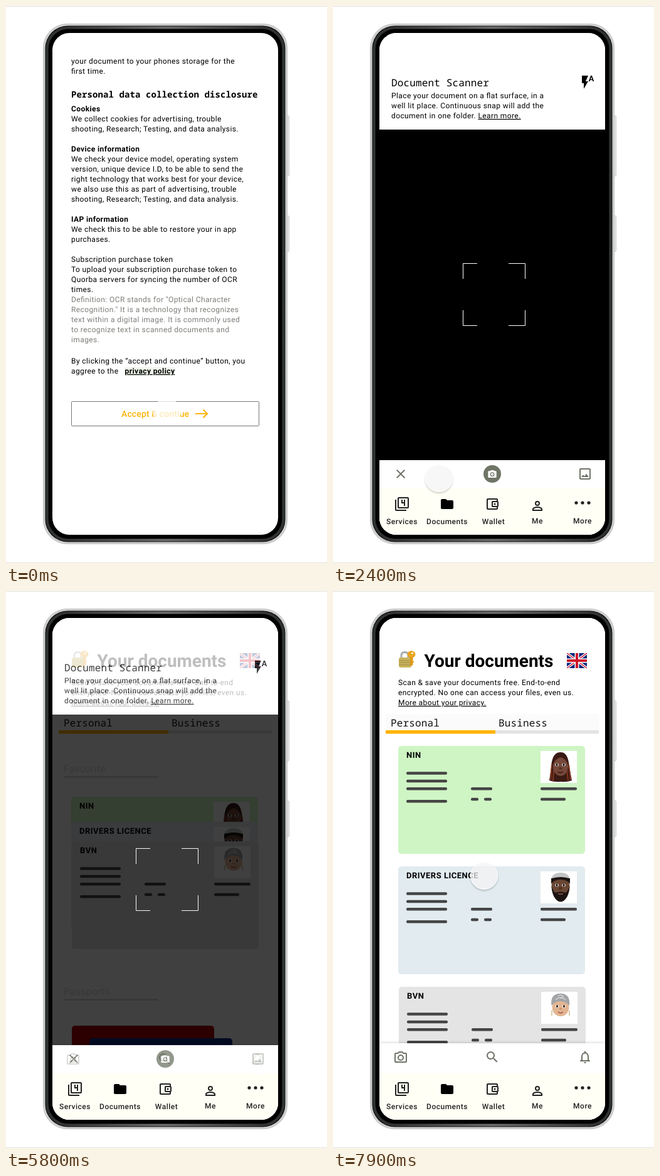
Animation of 512 by 888 pixels, one loop 8000 ms. Source, as an HTML page:

```html
<!DOCTYPE html>
<html lang="en">
<head>
<meta charset="utf-8">
<title>Document scanner prototype</title>
<style>
html, body { margin: 0; width: 100%; height: 100%; overflow: hidden; background: #fff; }
svg { position: absolute; left: 0; top: 0; display: block; }
text {
  font: 400 12px Roboto, sans-serif; letter-spacing: .4px; white-space: pre;
  font-feature-settings: "liga" 1; text-rendering: geometricPrecision;
}
.b { font-weight: 700; }
.u { text-decoration: underline 1px; text-underline-offset: 1.5px; }
.mono { font: 400 16px "Roboto Mono", "Noto Sans Mono", monospace; letter-spacing: .15px; }
.mono.b { font-weight: 700; font-size: 14px; letter-spacing: .1px; }
.big { font: 700 28px Roboto, sans-serif; letter-spacing: 0; }
.sec { font-size: 16px; letter-spacing: .1px; }
.lab { font-weight: 500; letter-spacing: .5px; text-anchor: middle; fill: #222; }
.title { font-weight: 700; font-size: 13px; letter-spacing: .5px; }
.cta { font-weight: 500; font-size: 14px; letter-spacing: .1px; fill: #fbb40a; }
.bar { filter: drop-shadow(0 -1px 2px rgba(0,0,0,.16)); }
#fav, #pass { color: #d9d9d9; }
#cursor {
  position: absolute; left: -22px; top: -22px; width: 44px; height: 44px;
  box-sizing: border-box; border: 1px solid #fff; border-radius: 50%;
}
</style>
</head>
<body>
<svg id="stage" width="512" height="888" viewBox="0 0 512 888"></svg>
<div id="cursor"></div>
<script>
const LOOP = 8000, STEP = 100;

const icons = {
  flash: 'M3 2v12h3v9l7-12H9l4-9H3zm16 0h-2l-3.2 9h1.9l.7-2h3.2l.7 2h1.9L19 2zm-2.15 5.65L18 4l1.15 3.65h-2.3z',
  close: 'M19 6.4 17.6 5 12 10.6 6.4 5 5 6.4 10.6 12 5 17.6 6.4 19 12 13.4 17.6 19 19 17.6 13.4 12z',
  snap: 'M9 2L7.17 4H4c-1.1 0-2 .9-2 2v12c0 1.1.9 2 2 2h16c1.1 0 2-.9 2-2V6c0-1.1-.9-2-2-2h-3.17L15 2zm3 15a5 5 0 1 1 0-10a5 5 0 1 1 0 10zM12 8.8a3.2 3.2 0 1 0 0 6.4a3.2 3.2 0 1 0 0-6.4z',
  image: 'M19 5v14H5V5h14m0-2H5c-1.1 0-2 .9-2 2v14c0 1.1.9 2 2 2h14c1.1 0 2-.9 2-2V5c0-1.1-.9-2-2-2zm-4.86 8.86l-3 3.87L9 13.14 6 17h12z',
  camera: 'M20 4h-3.17L15 2H9L7.17 4H4c-1.1 0-2 .9-2 2v12c0 1.1.9 2 2 2h16c1.1 0 2-.9 2-2V6c0-1.1-.9-2-2-2zm0 14H4V6h4.05l1.83-2h4.24l1.83 2H20zM12 7a5 5 0 1 0 0 10a5 5 0 1 0 0-10zm0 8a3 3 0 1 1 0-6a3 3 0 1 1 0 6z',
  search: 'M15.5 14h-.79l-.28-.27A6.5 6.5 0 1 0 13.73 14.43l.27.28v.79l5 4.99L20.49 19zm-6 0a4.5 4.5 0 1 1 0-9a4.5 4.5 0 1 1 0 9z',
  bell: 'M12 22c1.1 0 2-.9 2-2h-4c0 1.1.9 2 2 2zm6-6v-5c0-3.07-1.63-5.64-4.5-6.32V4a1.5 1.5 0 0 0-3 0v.68C7.64 5.36 6 7.92 6 11v5l-2 2v1h16v-1zm-2 1H8v-6c0-2.48 1.51-4.5 4-4.5s4 2.02 4 4.5z',
  services: 'M3 5H1v16c0 1.1.9 2 2 2h16v-2H3zm18-4H7c-1.1 0-2 .9-2 2v14c0 1.1.9 2 2 2h14c1.1 0 2-.9 2-2V3c0-1.1-.9-2-2-2zm0 16H7V3h14zm-6-2h2V5h-2v4h-2V5h-2v6h4z',
  folder: 'M10 4H4c-1.1 0-2 .9-2 2v12c0 1.1.9 2 2 2h16c1.1 0 2-.9 2-2V8c0-1.1-.9-2-2-2h-8z',
  wallet: 'M21 7.28V5c0-1.1-.9-2-2-2H5c-1.1 0-2 .9-2 2v14c0 1.1.9 2 2 2h14c1.1 0 2-.9 2-2v-2.28c.59-.35 1-.98 1-1.72V9c0-.74-.41-1.37-1-1.72zM20 9v6h-7V9zM5 19V5h14v2h-6c-1.1 0-2 .9-2 2v6c0 1.1.9 2 2 2h6v2zM16 10.5a1.5 1.5 0 1 0 0 3a1.5 1.5 0 1 0 0-3z',
  person: 'M12 6a2 2 0 1 1 0 4a2 2 0 1 1 0-4m0 9c2.7 0 5.8 1.29 6 2v1H6v-1c.2-.72 3.3-2 6-2m0-11a4 4 0 1 0 0 8a4 4 0 1 0 0-8zm0 9c-2.67 0-8 1.34-8 4v3h16v-3c0-2.66-5.33-4-8-4z'
};

const rect = (x, y, w, h, fill, r = 0, more = '') =>
  `<rect x="${x}" y="${y}" width="${w}" height="${h}" rx="${r}" fill="${fill}" ${more}/>`;
const oval = (x, y, rx, ry, fill) => `<ellipse cx="${x}" cy="${y}" rx="${rx}" ry="${ry}" fill="${fill}"/>`;
const path = (d, fill, more = '') => `<path d="${d}" fill="${fill}" ${more}/>`;
const line = (d, color, w) => path(d, 'none', `stroke="${color}" stroke-width="${w}"`);
const text = (x, y, s, cls = '', fill = '#000') => `<text x="${x}" y="${y}" class="${cls}" fill="${fill}">${s}</text>`;
const lines = (x, y, rows, fill) => rows.map((s, i) => text(x, y + i * 16, s, '', fill)).join('');
const icon = (name, x, y, fill = '#6f7468', k = 1) =>
  path(icons[name], fill, `fill-rule="evenodd" transform="translate(${x} ${y}) scale(${k})"`);
const group = (id, body, more = '') => `<g id="${id}" ${more}>${body}</g>`;

function phone() {
  const button = (y, h) => rect(446, y, 5.5, h, '#e6e6e5', 1.5, 'stroke="#b0b0ae" stroke-width=".6"');
  return rect(0, 0, 512, 1, '#e2e2e2') + rect(0, 887, 512, 1, '#e2e2e2') +
    button(175, 96) + button(334.5, 57) +
    rect(59.5, 28.5, 389, 829, '#cfd0ce', 38, 'stroke="#c2c3c1"') +
    rect(62.5, 31.5, 383, 823, '#0c0d0d', 36) +
    rect(65.5, 34.5, 377, 817, 'none', 34, 'stroke="url(#shell)" stroke-width="4"') +
    rect(68, 37, 372, 812, '#000', 32) +
    rect(74, 43, 360, 800, '#fff', 27);
}

function privacy() {
  return lines(104, 92, ['your document to your phones storage for the', 'first time.']) +
    text(104, 146, 'Personal data collection disclosure', 'mono b') +
    text(104, 168, 'Cookies', 'b') +
    lines(104, 184, ['We collect cookies for advertising, trouble', 'shooting, Research; Testing, and data analysis.']) +
    text(104, 232, 'Device information', 'b') +
    lines(104, 248, ['We check your device model, operating system',
      'version, unique device I.D, to be able to send the',
      'right technology that works best for your device,',
      'we also use this as part of advertising, trouble',
      'shooting, Research; Testing, and data analysis.']) +
    text(104, 344, 'IAP information', 'b') +
    lines(104, 360, ['We check this to be able to restore your in app', 'purchases.']) +
    lines(104, 408, ['Subscription purchase token', 'To upload your subscription purchase token to',
      'Quorba servers for syncing the number of OCR', 'times.']) +
    lines(104, 472, ['Definition: OCR stands for "Optical Character',
      'Recognition." It is a technology that recognizes',
      'text within a digital image. It is commonly used',
      'to recognize text in scanned documents and', 'images.'], '#7d7d78') +
    lines(104, 570, ['By clicking the “accept and continue” button, you', 'aggree to the']) +
    rect(189, 576, 80, 13, '#eef4ea') + text(189.5, 586, 'privacy policy', 'b u') +
    rect(104.5, 630.5, 299, 39, 'none', 1, 'stroke="#777"') +
    text(184, 655, 'Accept &amp; contiue', 'cta') +
    line('M302 650H321M314.5 643.5L321 650L314.5 656.5', '#fbb40a', 2);
}

function scanner() {
  return rect(74, 43, 360, 800, '#fff') + rect(74, 197, 360, 527, '#000') +
    text(93, 128, 'Document Scanner', 'mono') +
    lines(93, 147, ['Place your document on a flat surface, in a',
      'well lit place. Continuous snap will add the',
      'document in one folder. <tspan class="u">Learn more.</tspan>']) +
    icon('flash', 394, 109, '#000') +
    line('M207.5 435V410.5H230M280 410.5H306.5V435M207.5 485V509.5H230M280 509.5H306.5V485', '#fff', 1) +
    icon('close', 96, 734) + oval(254, 746, 14, 14, '#6f7566') +
    icon('snap', 246, 738.6, '#fff', .67) + icon('image', 390, 734);
}

function nav() {
  const ink = '#222';
  return rect(74, 769, 360, 74, '#fffff5') +
    icon('services', 98, 782, ink) + icon('folder', 170, 782, '#000') +
    icon('wallet', 242, 782, ink) + icon('person', 314, 785, ink) +
    [388, 398, 408].map(x => oval(x, 792, 2.6, 2.6, ink)).join('') +
    [['Services', 110, 826], ['Documents', 182, 826], ['Wallet', 256, 826], ['Me', 326, 825], ['More', 398, 825]]
      .map(([s, x, y]) => text(x, y, s, 'lab')).join('');
}

const eyes = (y, c) => [26, 37].map(x => oval(x, y, 2.8, 2.3, '#fff') + oval(x, y, 1.7, 1.9, c)).join('');
const smile = (y, c) => line(`M27.500 ${y}q4 3.500 8 0`, c, 1.5);

const faces = {
  girl: path('M32 2C21 2 18 13 17 26L14 47q8 3 18 2q11 1 18-2L46 26C45 13 42 2 32 2z', '#3a1a14') +
    line('M18 22L16 46M21 30L20 48M45 22L48 46M42 30L44 48', '#84371f', 2) +
    oval(32, 25, 12, 15, '#75483a') + path('M19.500 22Q22 6 32 5Q41 6 44.500 22Q40 12 32 10Q24 12 19.500 22z', '#3a1a14') +
    oval(32, 28, 2.6, 2, '#573224') + eyes(22, '#150b08') + smile(33, '#35150f'),
  man: oval(32, 24, 14.5, 17, '#6a4634') +
    path('M17.500 23Q18 37 24 44Q32 53 40 44Q46 37 46.500 23Q44 32 40 34Q32 31 24 34Q20 32 17.500 23z', '#1b1412') +
    path('M17 20V11Q32 7 47 11V20Q44 14 32 13Q20 14 17 20z', '#1b1412') +
    path('M17.500 11Q20 2 32 2Q44 2 46.500 11Q32 7 17.500 11z', '#c2c5c6') +
    oval(32, 27, 3, 2.2, '#53331f') + eyes(22, '#150b08') + line('M28 36h8', '#96564b', 1.6),
  lady: oval(31, 25, 13.5, 14, '#e2b592') +
    path('M16.500 22Q14 3 31 2.500Q47 3 45 22Q39 15 31 15Q22 15 16.500 22z', '#a2a4a6') +
    line('M23 13Q31 5 39 13M27 7q4-4 8 0q-1 4-5 3', '#d0d2d3', 1.3) +
    line('M17 30v8M45 30v8', '#c7b385', 1.4) +
    oval(31, 27, 2.2, 1.6, '#c99672') + `<g transform="translate(-.5 1)">${eyes(22, '#3c2a1e')}${smile(31, '#a34d44')}</g>`
};

function card(id, x, title, fill, face) {
  const bar = (bx, by, w) => rect(bx, by - 2.3, w, 4.6, '#454545', 2);
  const body = rect(0, 0, 298, 172, fill, 5) + text(13, 19, title, 'title') +
    [43.5, 56, 68.3, 88.3].map(y => bar(13, y, 65)).join('') +
    bar(116, 68.3, 34) + bar(116, 85, 12) + bar(137, 85, 12) +
    bar(227, 68.3, 58) + bar(227, 85, 40) +
    rect(227, 8, 58, 51, '#fff') + `<g transform="translate(227 8)">${faces[face]}</g>`;
  return group(id, body, `data-x="${x}"`);
}

function lock() {
  return line('M109 109V103Q109 97.500 114.500 97.500Q120 97.500 120 103V109', '#a4aaae', 3) +
    rect(105, 106, 20, 16, '#c9b45c', 3) +
    [110, 113.5, 117].map(y => rect(105.5, y, 19, 1.4, '#a8944a')).join('') +
    oval(125, 101, 6.5, 5.8, '#e9a520') + oval(126.5, 99, 1.8, 1.6, '#fff3d0') +
    path('M123 105h4.500v12l-2.200 3l-2.300-2.500z', '#e0991a') + rect(126, 112, 3, 2, '#e0991a');
}

function flag() {
  return `<svg x="373" y="99" width="32" height="24" viewBox="0 0 32 24">` +
    rect(0, 0, 32, 24, '#06257c') + line('M0 0L32 24M32 0L0 24', '#fff', 4) +
    line('M0 0L32 24M32 0L0 24', '#cf142b', 1.4) +
    line('M16 0V24M0 12H32', '#fff', 7) + line('M16 0V24M0 12H32', '#cf142b', 4) + '</svg>';
}

const section = (y, s) => text(92, y, s, 'sec', 'currentColor') + rect(92, y + 6, 151, 3, 'currentColor', 1.5);

function toolbar(id, x, y) {
  return group(id, rect(74, y - 22, 360, 791 - y, '#fff', 0, 'class="bar"') +
    icon('camera', x, y - 11) + icon('search', x + 146, y - 12) + icon('bell', x + 294, y - 12));
}

function documents() {
  return rect(74, 43, 360, 726, '#fff') + lock() +
    text(145.5, 121, 'Your documents', 'big') + flag() +
    lines(104, 150, ['Scan &amp; save your documents free. End-to-end',
      'encrypted. No one can access your files, even us.',
      '<tspan class="u">More about your privacy.</tspan>']) +
    rect(84, 196, 340, 26, '#fbfbfb') + rect(84, 222, 175, 5.5, '#ffb300') + rect(259, 222, 165, 5.5, '#e3e3e3') +
    text(92, 216, 'Personal', 'mono', '#111') + text(264, 216, 'Business', 'mono', '#111') +
    group('fav', section(289, 'Favourite')) +
    group('pass', section(644, 'Passports') +
      rect(105, 693, 227, 140, '#ae0000', 5) + rect(133, 713, 228, 140, '#0b2b86', 5)) +
    card('nin', 104, 'NIN', '#cff5c4', 'girl') +
    card('lic', 104, 'DRIVERS LICENCE', '#e2ebef', 'man') +
    card('bvn', 105, 'BVN', '#e4e4e4', 'lady') +
    toolbar('barA', 95, 746) + toolbar('barB', 96, 743);
}

const stage = document.getElementById('stage');
stage.innerHTML = `<defs>
  <linearGradient id="shell"><stop offset="0" stop-color="#303432"/><stop offset=".08" stop-color="#333"/>
  <stop offset=".5" stop-color="#6b6b6b"/><stop offset=".92" stop-color="#333"/><stop offset="1" stop-color="#303432"/></linearGradient>
  <clipPath id="glass"><rect x="74" y="43" width="360" height="800" rx="27"/></clipPath></defs>` +
  phone() + group('screen', group('privacy', privacy()) + group('scan', scanner()) +
    group('docs', documents()) + group('nav', nav()), 'clip-path="url(#glass)"');

// Rows are [time, values...]
const move = [
  [0, 257, 647], [700, 257, 647], [1000, 169, 753], [3600, 169, 753], [3800, 331, 769],
  [4000, 331, 769], [4600, 402, 749], [6100, 402, 749], [6600, 314, 607], [6700, 235, 479],
  [6900, 241, 454], [7400, 241, 454], [7500, 241, 452], [7600, 241, 454]
];
const scanFade = [[0, 0], [100, .55], [200, 1]];
const docsFade = [[5700, 0], [5800, .25], [5900, .65], [6000, .9], [6100, 1]];
const spread = [[7400, 0], [7500, .295], [7600, .62], [7700, .86], [7800, .97], [7900, 1]];
const press = [[0, 800, .73], [5600, 5900, .5]];
const cards = { nin: [328, 247], lic: [368, 439], bvn: [399, 631] };

function at(rows, t) {
  const i = rows.findIndex(r => r[0] > t);
  if (i === 0) return rows[0].slice(1);
  if (i < 0) return rows[rows.length - 1].slice(1);
  const a = rows[i - 1], b = rows[i], k = (t - a[0]) / (b[0] - a[0]);
  return a.slice(1).map((v, j) => v + (b[j + 1] - v) * k);
}

const el = id => document.getElementById(id);
const fade = (id, v) => el(id).setAttribute('opacity', v);
const shift = (id, x, y) => el(id).setAttribute('transform', `translate(${x} ${y})`);

function draw(t) {
  const [scan] = at(scanFade, t), [docs] = at(docsFade, t), [p] = at(spread, t), [x, y] = at(move, t);
  fade('scan', scan);
  fade('nav', scan);
  fade('docs', docs);
  fade('fav', 1 - p);
  fade('barA', 1 - p);
  fade('barB', p);
  shift('pass', 0, Math.round(232 * p));
  const grey = Math.round(217 - 150 * p);
  el('pass').style.color = `rgb(${grey},${grey},${grey})`;
  for (const id in cards) {
    const [a, b] = cards[id];
    shift(id, el(id).dataset.x, Math.round(a + (b - a) * p));
  }
  const tap = press.find(([from, to]) => t >= from && t < to), c = el('cursor').style;
  c.transform = `translate(${x}px, ${y}px)`;
  c.background = tap ? `rgba(255,255,255,${tap[2]})` : 'rgba(244,244,244,.73)';
  c.boxShadow = tap ? 'none' : '0 2px 3px rgba(0,0,0,.2)';
}

const start = performance.now();
function tick(now) {
  const t = Math.max(0, now - start) % LOOP;
  draw(Math.floor(t / STEP) * STEP);
  requestAnimationFrame(tick);
}
draw(0);
requestAnimationFrame(tick);
</script>
</body>
</html>
```
